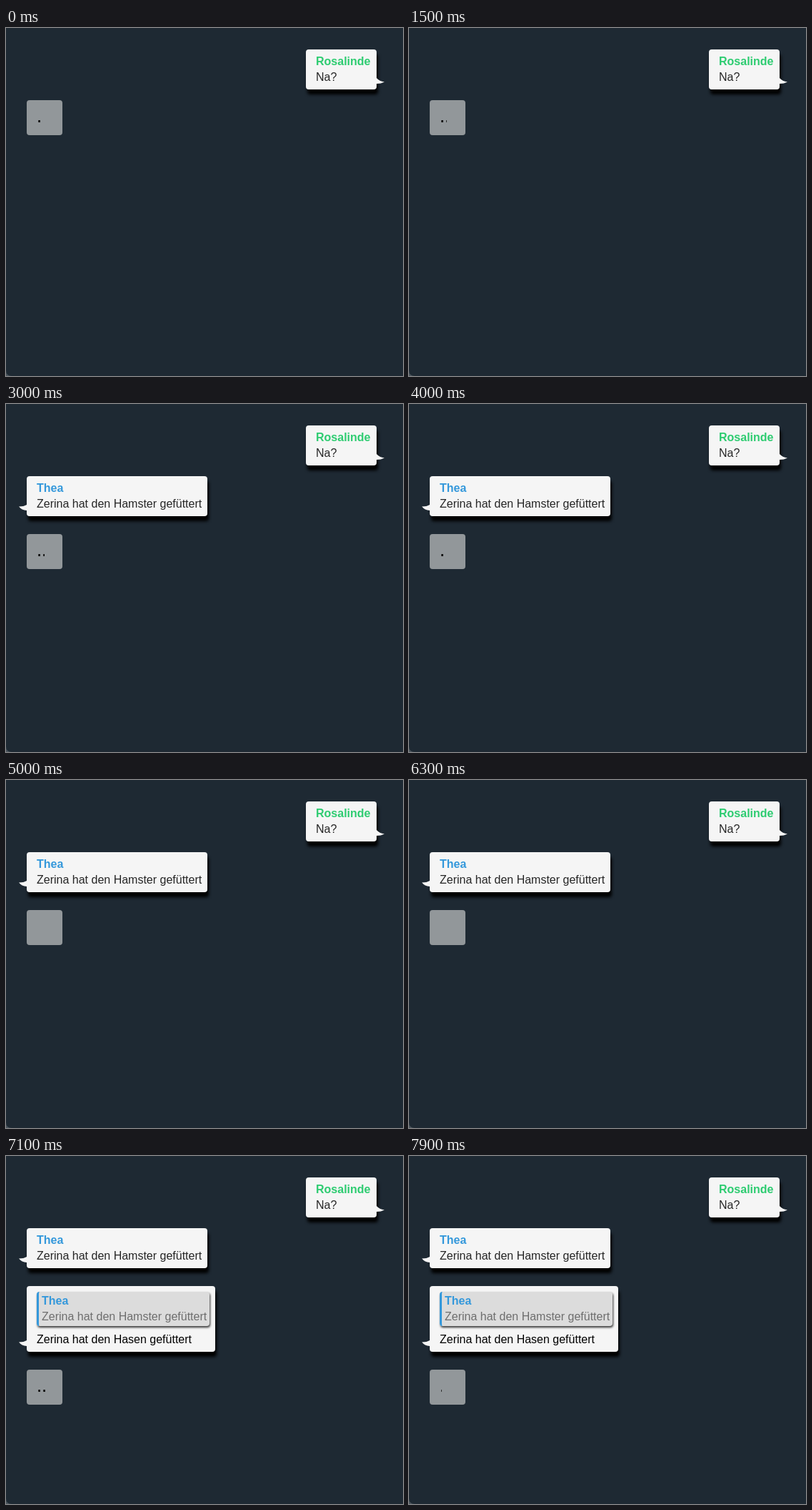
An HTML page that plays this animation: 556 px wide and 487 px high, repeating every 8000 ms.

```html
<!DOCTYPE html>
<html lang="de">
<head>
<meta charset="utf-8">
<title>Chat</title>
<style>
  html, body { margin: 0; width: 100%; height: 100%; overflow: hidden; background: #4a545c; }
  svg { display: block; font: 16px Arial, "Liberation Sans", sans-serif; }
  .box { fill: #f5f5f5; filter: drop-shadow(2px 7px 2px #000); }
  .tail { fill: #f5f5f5; }
  .name { font-weight: bold; }
  .blue { fill: #3498db; }
  .green { fill: #2ecc71; }
  .text { fill: #262626; }
  .quote { fill: #dcdcdc; filter: drop-shadow(1px 2px 1.5px #333); }
  .quoted { fill: #6e6e6e; }
</style>
</head>
<body>
<svg width="556" height="487" viewBox="0 0 556 487">
  <defs>
    <path id="tail" class="tail" d="M0 2.5Q7 2.5 11 0V8Q4 7.5 0 2.5Z"/>
    <linearGradient id="ink" gradientUnits="userSpaceOnUse" x1="0" x2="3">
      <stop offset="0" stop-color="#555"/>
      <stop offset=".4" stop-color="#000"/>
      <stop offset="1" stop-color="#222"/>
    </linearGradient>
  </defs>
  <path fill="#1e2933" d="M0 0H556V487H8Q0 487 0 479Z"/>

  <rect class="box" x="420" y="30" width="99" height="56" rx="4"/>
  <path class="tail" d="M519 70Q523 74.5 530 75.5Q525 78 519 78Z"/>
  <text class="name green" x="434" y="52">Rosalinde</text>
  <text class="text" x="434" y="74">Na?</text>

  <g id="first">
    <rect class="box" x="29" y="101" width="253" height="56" rx="4"/>
    <use href="#tail" x="18" y="141"/>
    <text class="name blue" x="43" y="123">Thea</text>
    <text class="text" x="43" y="145">Zerina hat den Hamster gefüttert</text>
  </g>

  <g id="second">
    <rect class="box" x="29" y="182" width="264" height="92" rx="4"/>
    <use href="#tail" x="18" y="258"/>
    <rect class="quote" x="43" y="190" width="242" height="48" rx="4"/>
    <path class="blue" d="M47 190Q46 190 46 194V234Q46 238 47 238Q43 238 43 234V194Q43 190 47 190Z"/>
    <text class="name blue" x="50" y="208">Thea</text>
    <text class="quoted" x="50" y="230">Zerina hat den Hamster gefüttert</text>
    <text x="43" y="262">Zerina hat den Hasen gefüttert</text>
  </g>

  <g id="typing">
    <rect x="29" width="50" height="49" rx="4" fill="#92979a"/>
  </g>
</svg>
<script>
  const LOOP = 8000, FIRST = 3000, SECOND = 6400;
  // Dots: cycle length, moment of clearing, delay of the first dot, gap between dots, time per pixel
  const CYCLE = 1365, CLEAR = 820, DELAY = 170, GAP = 452, PIXEL = 98;
  const get = id => document.getElementById(id);
  const first = get('first'), second = get('second'), typing = get('typing');

  const dots = [0, 1, 2].map(i => {
    const dot = document.createElementNS('http://www.w3.org/2000/svg', 'rect');
    dot.setAttribute('transform', `translate(${45 + 7 * i} 28)`);
    dot.setAttribute('height', 3);
    dot.setAttribute('fill', 'url(#ink)');
    return typing.appendChild(dot);
  });

  const show = (el, on) => el.setAttribute('visibility', on ? 'visible' : 'hidden');

  function draw(t) {
    show(first, t >= FIRST);
    show(second, t >= SECOND);
    const y = t < FIRST ? 101 : t < SECOND ? 182 : 299;
    typing.setAttribute('transform', `translate(0 ${y})`);

    const phase = (t - CLEAR + CYCLE) % CYCLE;
    dots.forEach((dot, i) => {
      const columns = Math.floor((phase - DELAY - GAP * i) / PIXEL) + 1;
      dot.setAttribute('width', Math.max(0, Math.min(3, columns)));
    });
  }

  const start = performance.now();
  function tick() {
    draw((performance.now() - start) % LOOP);
    requestAnimationFrame(tick);
  }
  tick();
</script>
</body>
</html>
```
